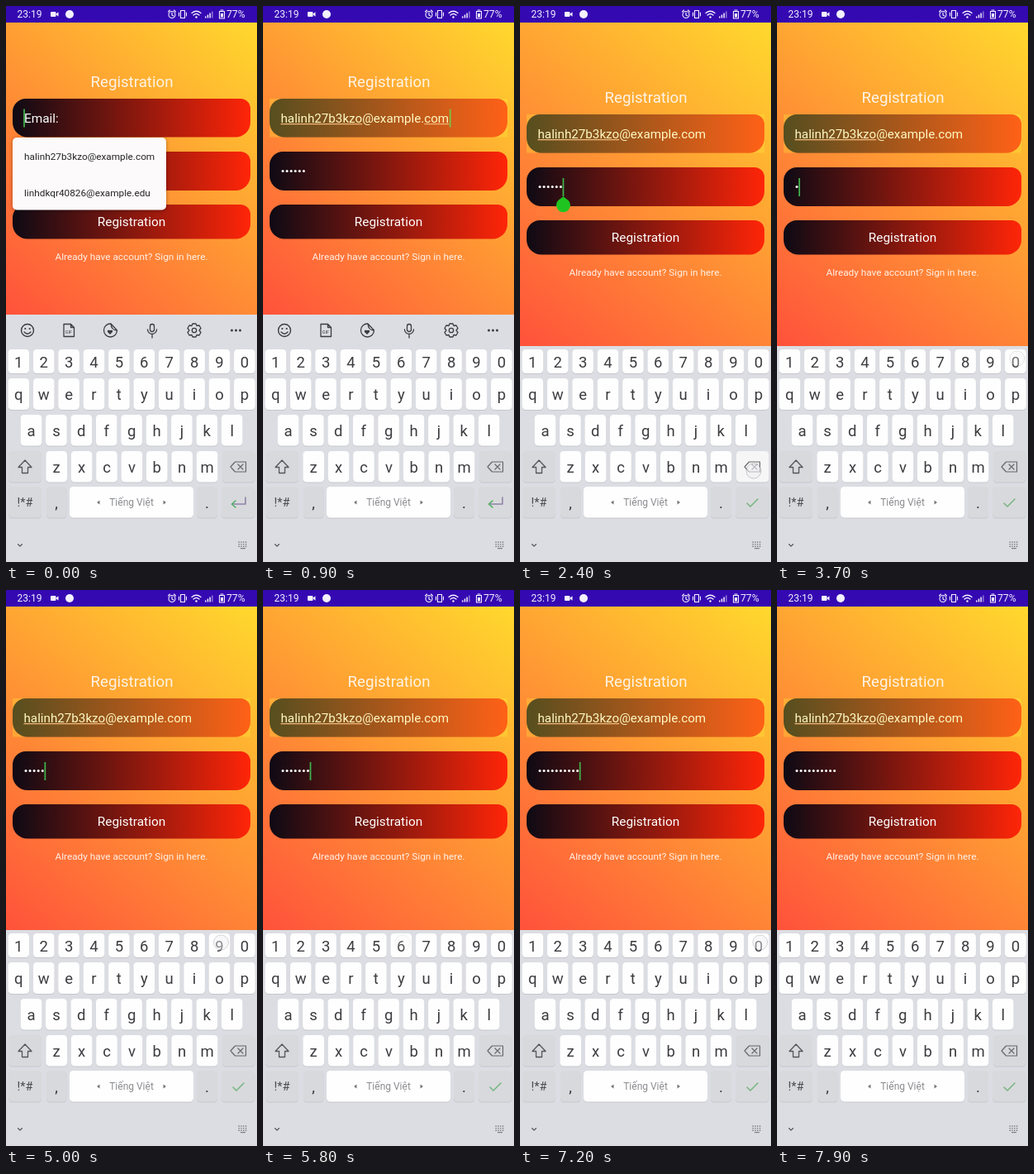
Recreate the animation shown at these times as an HTML page with a canvas. Size 304 by 672 pixels, loop 8000 ms.

```html
<!DOCTYPE html>
<html lang="en">
<head>
<meta charset="utf-8">
<title>Registration form</title>
<style>
html, body { margin: 0; width: 100%; height: 100%; overflow: hidden; background: #dcdde3; }
canvas { display: block; width: 304px; height: 672px; }
</style>
</head>
<body>
<canvas id="stage"></canvas>
<script>
const canvas = document.getElementById('stage');
const c = canvas.getContext('2d');
const dpr = window.devicePixelRatio || 1;
canvas.width = 304 * dpr;
canvas.height = 672 * dpr;

const LOOP = 8000, FILL = 500, FOCUS = 1200, RESIZE = 1500;
const LOCAL = 'halinh27b3kzo', EMAIL = LOCAL + '@example.com', OTHER = 'linhdkqr40826@example.edu';
const DIGITS = '0317926450';
const TYPED = [3600, 3950, 4300, 4600, 4950, 5300, 5650, 6000, 6700, 7150];
const DELETED = [0, 1, 2, 3, 4, 5].map(i => 2450 + 150 * i);
const ERASE_DOWN = 2350, ERASE_UP = 3250;
const INK = '#3c3c40';

function text(s, x, y, size, color, align = 'left') {
  c.font = `${size}px Roboto, sans-serif`;
  c.fillStyle = color;
  c.textAlign = align;
  c.fillText(s, x, y + size * .355);
}

function box(x, y, w, h, r, fill) {
  c.beginPath();
  c.roundRect(x, y, w, h, r);
  c.fillStyle = fill;
  c.fill();
}

function line(d, color, width = 1.3) {
  c.strokeStyle = color;
  c.lineWidth = width;
  c.stroke(new Path2D(d));
}

function shape(d, color) {
  c.fillStyle = color;
  c.fill(new Path2D(d));
}

function circle(x, y, r, color, width) {
  c.beginPath();
  c.arc(x, y, r, 0, 7);
  if (width) {
    c.strokeStyle = color;
    c.lineWidth = width;
    c.stroke();
  } else {
    c.fillStyle = color;
    c.fill();
  }
}

function gradient(x0, y0, x1, y1, from, to) {
  const g = c.createLinearGradient(x0, y0, x1, y1);
  g.addColorStop(0, from);
  g.addColorStop(1, to);
  return g;
}

function statusBar() {
  box(0, 0, 304, 20, 0, '#3509b2');
  const w = '#f4f1ff';
  text('23:19', 13.5, 10, 12, w);
  box(54, 7, 6.5, 6, 1, w);
  shape('M60 10l3.5-2.7v5.4z', w);
  circle(77, 10, 5, w);
  circle(201, 10.5, 4, w, 1.1);
  line('M201 8v3l2 1M196.5 7l2-2M205.5 7l-2-2', w, 1.1);
  line('M211.5 5.5h5v9h-5zM209.5 8v4M218.5 8v4', w, 1.1);
  line('M225 8.5q5.5-4.5 11 0M227 11q3.5-3 7 0', w);
  circle(230.5, 13.5, 1.2, w);
  for (let i = 0; i < 4; i++) box(241 + i * 2.7, 12.5 - i * 2, 1.5, 2 + i * 2, 0, i < 3 ? w : '#8f78d8');
  line('M258.5 6.5h6v8.5h-6zM260 5h3', w, 1.1);
  box(260, 9, 3, 4.5, 0, w);
  text('77%', 267, 10, 12.2, w);
}

function field(y, h) {
  box(8, y, 288, h, [16, 12, 18, 18], gradient(8, 0, 296, 0, '#0e0a14', '#ff2508'));
}

function cursor(x, y) {
  box(x - .9, y - 11, 1.8, 22, 0, '#3fae4c');
}

function form(t, top, dots, blink) {
  const bottom = 373 + top * 2;
  box(0, 20, 304, bottom - 20, 0, gradient(0, bottom, 304, 20, '#ff523b', '#ffd92d'));
  text('Registration', 152.5, top + 91, 18.7, '#fff3e6', 'center');

  field(top + 112, 46.5);
  if (t < FILL) {
    text('Email:', 22, top + 136, 15.4, '#fff');
  } else {
    text(EMAIL, 21.5, top + 135.5, 15.2, '#fff');
    const underline = (from, to) => {
      const start = c.measureText(EMAIL.slice(0, from)).width;
      box(21.5 + start, top + 142, c.measureText(EMAIL.slice(from, to)).width, 1.2, 0, '#eea59a');
    };
    underline(0, LOCAL.length);
    if (t < FOCUS) underline(EMAIL.length - 3, EMAIL.length);
  }
  if (blink && t < FOCUS) cursor(t < FILL ? 22 : 23 + c.measureText(EMAIL).width, top + 135.5);
  if (t >= FILL) box(8, top + 112, 288, 46.5, 0, 'rgba(255,235,59,.3)');

  field(top + 176, 47);
  if (!dots) text('Password:', 22, top + 200, 15.4, '#fff');
  for (let i = 0; i < dots; i++) circle(24 + 5.07 * i, top + 199.5, 1.5, '#fff');
  if (blink && t >= FOCUS) cursor(22 + 5.07 * dots, top + 200);

  field(top + 240, 41.5);
  text('Registration', 152, top + 261, 15.4, '#fff', 'center');
  text('Already have account? Sign in here.', 152, top + 303, 11.8, '#fff1e8', 'center');

  if (t >= FOCUS && t < DELETED[0]) {
    const x = 22 + 5.07 * dots, y = top + 211.3;
    shape(`M${x} ${y}l6.5 5a8.5 8.5 0 1 1-13 0z`, '#20c420');
  }
}

function dropdown(t) {
  c.globalAlpha = Math.max(0, Math.min(1, (450 - t) / 100));
  c.shadowColor = 'rgba(0,0,0,.35)';
  c.shadowBlur = 4 * dpr;
  c.shadowOffsetY = dpr;
  box(8, 159, 186, 87.5, 5, '#fcfafb');
  c.shadowColor = 'transparent';
  text(EMAIL, 22, 181.5, 11.8, '#252525');
  text(OTHER, 22, 225.5, 11.8, '#252525');
  c.globalAlpha = 1;
}

function toolbar() {
  circle(26, 392, 7.5, INK, 1.4);
  circle(23.3, 390, 1.1, INK);
  circle(28.7, 390, 1.1, INK);
  line('M22 394q4 4.5 8 0', INK);
  line('M70 384.5h8.5l4 4v11h-12.5zM78.5 384.5v4h4', INK);
  text('GIF', 76, 394, 5.5, INK, 'center');
  line('M127 384a8 8 0 1 0 7.5 8q-7 0-7.5-8l7.5 8', INK);
  shape('M126 397l-3-3q-1-3 3-2q4-1 3 2z', INK);
  line('M174.5 387a2.5 2.5 0 0 1 5 0v4a2.5 2.5 0 0 1-5 0zM171.5 391a5.5 5.5 0 0 0 11 0M177 397v4', INK);
  line('M226 384h4l1 2.5 3-.5 2 3.5-2 2.5 2 2.5-2 3.5-3-.5-1 2.5h-4l-1-2.5-3 .5-2-3.5 2-2.5-2-2.5 2-3.5 3 .5z', INK);
  circle(228, 392, 2.7, INK, 1.3);
  for (const x of [273.5, 278.5, 283.5]) circle(x, 392, 1.5, INK);
}

function key(x, y, w, h, fill = '#fefefe') {
  box(x, y + 1, w, h, 4.5, '#c6c7cd');
  box(x, y, w, h, 4.5, fill);
}

function keyboard(full, pressed, erasing) {
  const top = full ? 373 : 411, special = '#d8d9dc';
  box(0, top, 304, 672 - top, 0, '#dcdde3');
  if (full) toolbar();
  const rows = [['1234567890', 15.3, 415, 29], ['qwertyuiop', 15.3, 450, 38],
                ['asdfghjkl', 30.5, 494, 37.5], ['zxcvbnm', 61.2, 538, 37.5]];
  for (const [chars, left, y, h] of rows) {
    [...chars].forEach((ch, i) => {
      const x = left + 30.4 * i;
      key(x - 12.8, y, 25.6, h, ch === pressed ? '#a9aaad' : '#fefefe');
      text(ch, x, y + h / 2 + .5, 18.5, INK, 'center');
    });
  }
  key(3, 538, 40, 37.5, special);
  key(262, 538, 39.5, 37.5, erasing ? '#f6f6f7' : special);
  line('M23 549l8 8.5h-4.5v7h-7v-7h-4.5z', '#55565a');
  line('M272 557l5.5-6h13v12h-13zM281 554l6 6M287 554l-6 6', '#66676b', 1.2);

  key(3, 581, 40, 37.5, special);
  key(49, 581, 24.5, 37.5, special);
  key(77, 581, 150, 37.5);
  key(231, 581, 25, 37.5, special);
  key(261, 581, 40.5, 37.5, special);
  text('!*#', 23, 600, 14.5, '#4a4b4f', 'center');
  text(',', 61, 600, 18.5, INK, 'center');
  text('.', 243.5, 600, 18.5, INK, 'center');
  text('Tiếng Việt', 152, 600, 12, '#8b8c90', 'center');
  shape('M110 600l3.5-2.5v5zM194 600l-3.5-2.5v5z', '#77787c');
  if (full) {
    line('M290 594v8h-15', '#8f83a6', 1.6);
    line('M278 598l-4.5 4 4.5 4', '#4fae62', 1.6);
  } else {
    line('M275 601l4 4 9-9', '#74b582', 1.5);
  }

  line('M14.5 650.5l2.5 2.5 2.5-2.5', '#55565a', 1.1);
  c.setLineDash([1.4, 1.4]);
  c.lineCap = 'butt';
  line('M281.5 648h11M281.5 650.6h11M281.5 653.2h11', '#77787c', 1.4);
  c.setLineDash([]);
  line('M284 655.6h6', '#77787c', 1.1);
  c.lineCap = 'round';
}

// Touch marker: solid while down, then a short fade.
function touch(t, x, y, down, up) {
  const a = t < down ? 0 : t < up ? 1 : 1 - (t - up) / 200;
  if (a <= 0) return;
  c.globalAlpha = a;
  circle(x, y, 9, 'rgba(240,240,243,.6)');
  circle(x, y, 9, 'rgba(130,130,135,.4)', 1);
  c.globalAlpha = 1;
}

function keyX(digit) {
  return 15.3 + 30.4 * ((+digit + 9) % 10);
}

function popup(digit) {
  const x = Math.max(3, Math.min(263, keyX(digit) - 19));
  c.shadowColor = 'rgba(0,0,0,.25)';
  c.shadowBlur = 3 * dpr;
  box(x, 352, 38.5, 52, 4, '#fdfdfd');
  c.shadowColor = 'transparent';
  text(digit, x + 19.2, 378, 28, INK, 'center');
}

function draw(t) {
  c.setTransform(dpr, 0, 0, dpr, 0, 0);
  c.lineCap = c.lineJoin = 'round';
  const done = list => list.filter(e => e <= t);
  const dots = (t < FILL ? 0 : 6) - done(DELETED).length + done(TYPED).length;
  const lastEdit = Math.max(...done([0, FILL, FOCUS, ...DELETED, ...TYPED]));
  const blink = (t - lastEdit) % 1000 < 500;
  const active = TYPED.findIndex(e => t >= e - 130 && t < e);
  const pressed = active < 0 ? '' : DIGITS[active];
  const resized = t >= RESIZE;

  form(t, resized ? 19 : 0, dots, blink);
  if (t < 450) dropdown(t);
  keyboard(!resized, pressed, t >= ERASE_DOWN && t < ERASE_UP);
  statusBar();
  if (pressed) popup(pressed);

  touch(t, 100, 184, 180, 320);
  touch(t, 66, 202, 1080, 1200);
  touch(t, 283, 562, ERASE_DOWN, ERASE_UP);
  TYPED.forEach((e, i) => touch(t, keyX(DIGITS[i]) + 2, 426, e - 130, e));
}

function frame(now) {
  draw(now % LOOP);
  requestAnimationFrame(frame);
}
requestAnimationFrame(frame);
</script>
</body>
</html>
```
